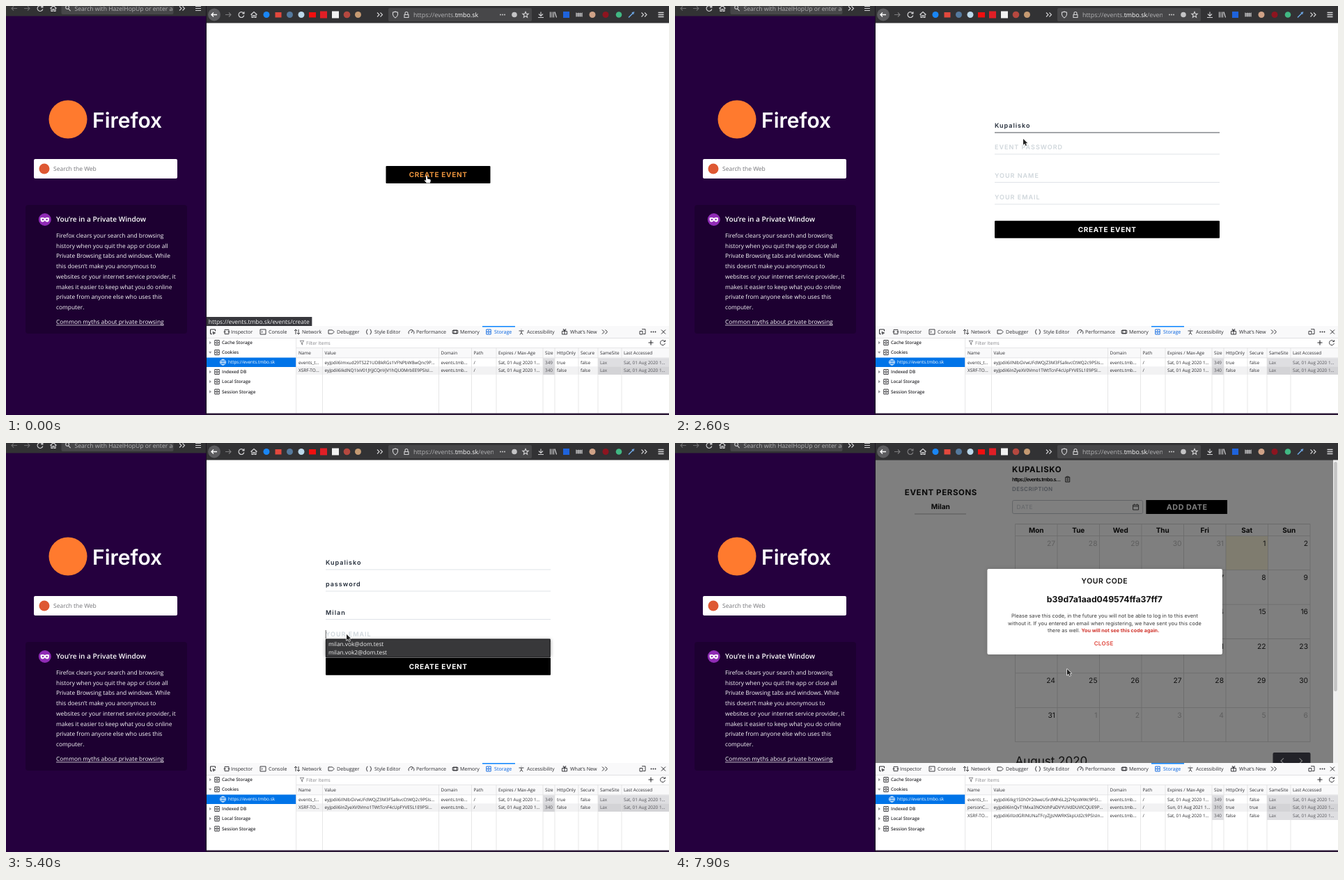
Write an HTML page with a canvas that moves like this. It is 952 px wide and 588 px high and loops after 8000 ms.

```html
<!DOCTYPE html>
<html lang="en">
<head>
<meta charset="utf-8">
<title>Create event</title>
<style>
html, body { margin: 0; width: 100%; height: 100%; overflow: hidden; background: #fff; }
canvas { display: block; width: 952px; height: 588px; }
</style>
</head>
<body>
<canvas id="stage"></canvas>
<script>
const W = 952, H = 588, LOOP = 8000;
const stage = document.getElementById('stage');
const dpr = window.devicePixelRatio || 1;
stage.width = W * dpr;
stage.height = H * dpr;
const g = stage.getContext('2d');

const EVENT = 'Kupalisko', PERSON = 'Milan', MAIL = 'milan.vok@dom.test';
const ui = (px, weight = 400) => `${weight} ${px}px "Open Sans", "Noto Sans", sans-serif`;
const page = (px, weight = 400) => `${weight} ${px}px Inter, sans-serif`;

const ICON = {
  back: 'M4 0H-4M-1-3L-4 0L-1 3',
  next: 'M-4 0H4M1-3L4 0L1 3',
  reload: 'M3-2.4A3.9 3.9 0 1 0 3.8 1M3.9-4.2V-1.6H1.3',
  stop: 'M-3-3L3 3M3-3L-3 3',
  home: 'M-4.5 0L0-4L4.5 0M-3-.8V4H-1V1H1V4H3V-.8',
  more: 'M-4-3L-1 0L-4 3M.5-3L3.5 0L.5 3',
  menu: 'M-4-3H4M-4 0H4M-4 3H4',
  shield: 'M0-4.4L3.5-3.4V0Q3 3 0 4.4Q-3 3-3.5 0V-3.4Z',
  lock: 'M-2 0V-2A2 2 0 0 1 2-2V0M-3 0H3V4H-3Z',
  star: 'M0-4.2L1.2-1.4L4.2-1.2L1.9.8L2.6 3.8L0 2.1L-2.6 3.8L-1.9.8L-4.2-1.2L-1.2-1.4Z',
  load: 'M0-4V2M-3-1L0 2L3-1M-4 4H4',
  books: 'M-4-4V4M-1.5-4V4M1-4V4M2.5-4L5 4',
  grid: 'M-4-3V3M-1.3-3V3M1.3-3V3M4-3V3M-4.5-1H4.5M-4.5 1.5H4.5',
  pen: 'M-4 4L2-2M1-3.5L3.5-1M2-2L4-4',
  find: 'M1.5-1.5A2.4 2.4 0 1 1 1.5-1.6M.8.6L3.6 3.6',
  pick: 'M3.5-1V-3.5H-3.5V3H-1M0 0L3.5 1.5L1.8 2L1.2 3.6Z',
  inspect: 'M-3-3H3V3H-3ZM-4.3 0H-1.5M1.5 0H4.3',
  prompt: 'M-4-3.5H4V3.5H-4ZM-2.3-1.5L-.8 0L-2.3 1.5',
  arrows: 'M-2 3.5V-3.5L-4-1.5M-2-3.5L0-1.5M2-3.5V3.5L4 1.5M2 3.5L0 1.5',
  tag: 'M-4-2.6H1.6L4.2 0L1.6 2.6H-4Z',
  braces: 'M-1.5-3.5Q-3-3.5-3-1.5Q-3 0-4 0Q-3 0-3 1.5Q-3 3.5-1.5 3.5M1.5-3.5Q3-3.5 3-1.5Q3 0 4 0Q3 0 3 1.5Q3 3.5 1.5 3.5',
  gauge: 'M-3.6 2.8A4 4 0 1 1 3.6 2.8M0 1.5L2-2',
  chip: 'M-3.8-2H3.8V2H-3.8ZM-2-3.4V3.4M0-3.4V-2M0 2V3.4M2-3.4V3.4',
  store: 'M-3.2-3.5H3.2V3.5H-3.2ZM-3.2 0H3.2M-1-1.7H1M-1 1.7H1',
  person: 'M-3.5-1.5H3.5M0-1.5V1M0 1L-2 4M0 1L2 4M0-3.8V-3.3',
  gift: 'M-3.5-1H3.5V3.5H-3.5ZM0-1V3.5M0-1Q-3-4-1.5-4Q0-3.5 0-1Q0-3.5 1.5-4Q3-4 0-1',
  globe: 'M4 0A4 4 0 1 1 4-.1M-4 0H4M0-4Q-3.6 0 0 4Q3.6 0 0-4',
  screens: 'M-1-3.8H4V3H1M-4-1H0V3.5H-4Z',
  funnel: 'M-2.8-2.8H2.8L.7 0V3L-.7 2V0Z',
  plus: 'M-3.5 0H3.5M0-3.5V3.5',
  clip: 'M-1.2-3H-3V4H3V-3H1.2M-1.2-3.8H1.2V-2H-1.2ZM-1.5 0H1.5M-1.5 2H1.5',
  date: 'M-4-3H4V4H-4ZM-4-1H4M-2-4.4V-3M2-4.4V-3',
  left: 'M2-3.8L-2 0L2 3.8',
  right: 'M-2-3.8L2 0L-2 3.8',
  arrow: 'M0 0V8.8L2.1 6.8L3.5 10L5 9.3L3.6 6.2H6.3Z',
  beam: 'M-1.8-5Q0-5 0-4Q0-5 1.8-5M0-4V4M-1.8 5Q0 5 0 4Q0 5 1.8 5',
  hand: 'M-.9 1Q0-.8 1 1V4.4L4.8 5.2Q6 5.6 5.8 7L5 10.6H-.2L-3.4 6.6Q-3 5.6-.9 7Z',
  mask: 'M49.5 304.5Q53 303.3 55.8 305Q58.6 303.3 62 304.5Q62.5 310.5 59 310.5Q57 310.5 55.8 308.5Q54.5 310.5 52.5 310.5Q49 310.5 49.5 304.5Z'
};
for (const k in ICON) ICON[k] = new Path2D(ICON[k]);

function rect(x, y, w, h, fill, r = 0) {
  g.fillStyle = fill;
  g.beginPath();
  g.roundRect(x, y, w, h, r);
  g.fill();
}
function frame(x, y, w, h, color, r = 0) {
  g.strokeStyle = color;
  g.lineWidth = 1;
  g.beginPath();
  g.roundRect(x, y, w, h, r);
  g.stroke();
}
function disc(x, y, r, fill) {
  g.fillStyle = fill;
  g.beginPath();
  g.arc(x, y, r, 0, 7);
  g.fill();
}
function icon(name, x, y, color, width = 1.1, size = 1) {
  g.save();
  g.translate(x, y);
  g.scale(size, size);
  g.strokeStyle = color;
  g.lineWidth = width;
  g.stroke(ICON[name]);
  g.restore();
}
function dots(x, y, color) {
  for (const d of [-3, 0, 3]) disc(x + d, y, 0.9, color);
}
function text(s, x, y, font, color, align = 'left', space = 0) {
  g.font = font;
  g.letterSpacing = space + 'px';
  g.textAlign = align;
  g.fillStyle = color;
  g.fillText(s, x, y);
  return g.measureText(s).width;
}
function clipped(x, y, w, h, draw) {
  g.save();
  g.beginPath();
  g.rect(x, y, w, h);
  g.clip();
  draw();
  g.restore();
}
function shadow(blur, color, draw) {
  g.save();
  g.shadowBlur = blur * dpr;
  g.shadowColor = color;
  draw();
  g.restore();
}

const NOTE = [
  'Firefox clears your search and browsing',
  'history when you quit the app or close all',
  'Private Browsing tabs and windows. While',
  'this doesn’t make you anonymous to',
  'websites or your internet service provider, it',
  'makes it easier to keep what you do online',
  'private from anyone else who uses this',
  'computer.'
];

function privateWindow() {
  rect(0, 0, 288, H, '#25003e');
  rect(0, 0, 288, 14.5, '#323234');
  icon('back', 12, 3.5, '#6a6a6c');
  icon('next', 30, 3.5, '#6a6a6c');
  icon('reload', 49, 3.5, '#d5d5d7');
  icon('home', 68, 3.5, '#d5d5d7');
  rect(79.5, -4, 161, 16, '#474749', 2);
  icon('find', 89, 3.5, '#cfcfd1');
  clipped(98, 0, 142, 14, () => text('Search with HazelHopUp or enter address', 98.5, 6.5, ui(8.6), '#b4b4b6'));
  icon('more', 253, 3.5, '#d5d5d7');
  icon('menu', 276, 3.5, '#d5d5d7');

  disc(89, 163, 27.5, '#ff7a2e');
  text('Firefox', 124, 174.5, page(30, 600), '#fff');
  rect(40, 220, 206, 28, '#fff', 2);
  disc(55, 234, 7.5, '#de5833');
  text('Search the Web', 68, 237.3, ui(8.5), '#737377');

  rect(28, 286, 232, 185, '#1d0031', 4);
  disc(55.8, 307, 9, '#8f2bb5');
  g.fillStyle = '#fff';
  g.fill(ICON.mask);
  disc(53, 307, 1.3, '#8f2bb5');
  disc(58.6, 307, 1.3, '#8f2bb5');
  text('You’re in a Private Window', 72, 309.8, ui(10.1, 600), '#fff');
  NOTE.forEach((s, i) => text(s, 72, 333 + i * 14.72, ui(8.4, 500), '#f9f9fa'));
  const w = text('Common myths about private browsing', 72, 457, ui(8.4, 500), '#f9f9fa');
  rect(72, 458.5, w, 0.8, '#f9f9fa');
}

function toolbar(t) {
  const loading = t >= 600 && t < 1500 || t >= 6600 && t < 7800;
  const idle = t >= 1000 && t < 1500 || t >= 7100 && t < 7700;
  const c = '#d5d5d7', dim = '#7c7c7e';
  rect(288, 0, 664, 24.5, '#323234');
  disc(299, 12.5, 9, '#5c5c5f');
  icon('back', 299, 12.5, '#fff', 1.3);
  icon('next', 319, 12.5, dim);
  icon(loading ? 'stop' : 'reload', 338, 12.5, t >= 7800 ? dim : c, 1.2);
  icon('home', 356, 12.5, c);
  disc(374, 12.5, 4.5, '#1a86f5');
  rect(386.5, 9, 9, 7.5, '#e2483d');
  disc(407.5, 12.5, 4.5, '#557a9e');
  disc(424, 12.5, 4.5, '#bcd8ea');
  rect(435, 9, 10, 7.5, '#f00f0f');
  rect(451, 7.5, 10, 10, '#e01f26');
  rect(468, 7.5, 10, 10, '#f2f2f2');
  disc(489.5, 12.5, 4.8, '#b5483f');
  disc(505.5, 12.5, 4.5, '#c59a72');
  icon('more', 537, 12.5, c);

  rect(549, 3, 206, 19, '#474749', 2);
  icon('shield', 559, 12.5, c);
  icon('lock', 575, 12.5, c);
  clipped(584, 3, 116, 19, () => {
    let x = 585;
    x += text('https://events.', x, 15.6, ui(8.9), '#b4b4b6');
    x += text('tmbo.sk', x, 15.6, ui(8.9), '#fff');
    if (t >= 1000) text('/events', x, 15.6, ui(8.9), '#b4b4b6');
  });
  dots(713, 12.5, c);
  disc(730, 12.5, 3.8, '#c4c4c6');
  icon('star', 746, 12.5, c);

  icon('load', 768, 12.5, c);
  icon('books', 785.5, 12.5, c);
  rect(800, 8, 9, 9, '#1f63dc');
  icon('grid', 823, 12.5, c);
  disc(842, 12.5, 4.5, '#cfa287');
  disc(861, 12.5, 4.5, '#8d1520');
  disc(880, 12.5, 4.3, idle ? '#77777a' : '#41b883');
  icon('pen', 898, 12.5, '#6fa8e6', 1.5);
  icon('more', 916.5, 12.5, c);
  icon('menu', 940.5, 12.5, c, 1.3);
}

const TABS = [
  [317, 323, 'inspect', 'Inspector'], [369, 377, 'prompt', 'Console'],
  [418, 425, 'arrows', 'Network'], [467, 475, 'tag', 'Debugger'],
  [521, 529, 'braces', 'Style Editor'], [582, 589, 'gauge', 'Performance'],
  [645, 652, 'chip', 'Memory'], [693, 701, 'store', 'Storage'],
  [740, 748, 'person', 'Accessibility'], [802, 810, 'gift', 'What’s New']
];
const TREE = [[484, 'Cache Storage'], [498, 'Cookies'], [526, 'Indexed DB'], [540, 'Local Storage'], [554.5, 'Session Storage']];
const HEADS = ['Name', 'Value', 'Domain', 'Path', 'Expires / Max-Age', 'Size', 'HttpOnly', 'Secure', 'SameSite', 'Last Accessed'];
const COLS = [417, 454.5, 621.5, 668.5, 704, 771, 788, 822, 850, 884, 952];
const SESSION = ['Imxud29TS2Z1UDBkRGs1VFNPbW8wQnc9P…', 'IlNIbGVwUFdWQjZ3M3FSalkvcCtWQ2c9PSIs…', 'Ikg1S0h0Y2dweU5rdWh6L2J2YkJsWWc9PSI…'];
const XSRF = ['IkdNQ1IxV01JYjJCQnVjV1hQU0MrbEE9PSIsI…', 'InZyeXV0Vmo1TWtTcnF4cUpFYVE5L1E9PSI…', 'IlIzdGRINUNaTFcyZjJsNWRKSkpUd2c9PSIsIn…'];

function cookies(t) {
  const v = t < 1600 ? 0 : t < 7800 ? 1 : 2;
  const day = 'Sat, 01 Aug 2020 1…';
  const row = (name, value, until, size, http, secure) =>
    [name, 'eyJpdiI6' + value, 'events.tmb…', '/', until, size, http, secure, 'Lax', day];
  const list = [
    row('events_t…', SESSION[v], day, '349', 'true', 'false'),
    row('XSRF-TO…', XSRF[v], day, '340', 'false', 'false')
  ];
  if (v === 2) list.splice(1, 0, row('personC…', 'InQvT1Mxa3NOVzhPaDVYUVdDUVlCQUE9P…', 'Sun, 01 Aug 2021 1…', '310', 'true', 'true'));
  return list;
}

function devtools(t) {
  const dark = '#2a2a2e', grey = '#55555a', line = '#e0e0e2';
  rect(288, 460, 664, 128, '#fff');
  rect(288, 460, 664, 17, '#f9f9fa');
  rect(288, 477, 664, 1, line);
  icon('pick', 297, 468.5, dark, 1);
  for (const [ix, tx, name, label] of TABS) {
    const c = label === 'Storage' ? '#0060df' : dark;
    icon(name, ix, 468.5, c, 0.9);
    text(label, tx, 471.2, ui(7.1), c);
  }
  rect(684, 460, 47, 1.5, '#0a84ff');
  icon('more', 860, 468.5, dark, 1);
  icon('screens', 914, 468.5, dark, 0.9);
  dots(929.5, 468.5, dark);
  icon('stop', 944, 468.5, dark, 1);

  rect(288, 505.5, 128.5, 13.5, '#0074e8');
  for (const [y, label] of TREE) {
    g.fillStyle = '#98989c';
    g.fill(new Path2D(label === 'Cookies'
      ? `M291 ${y - 1.3}h4.4l-2.2 3z` : `M292 ${y - 2.2}v4.4l3-2.2z`));
    icon('store', 303, y, dark, 0.9);
    text(label, 310, y + 2.3, ui(6.4, 600), dark);
  }
  icon('globe', 311.5, 512.2, '#fff', 0.9);
  text('https://events.tmbo.sk', 319, 514.4, ui(6.4), '#fff');
  rect(416.3, 477.5, 0.8, 108, line);

  icon('funnel', 425, 484, '#7a7a7e', 0.9);
  text('Filter Items', 431, 486.6, ui(6.7), '#85858a');
  icon('plus', 926, 484, dark, 1.1);
  icon('reload', 943, 484, dark, 1, 0.9);
  rect(417, 491, 535, 15, '#f9f9fa');
  rect(417, 491, 535, 0.8, line);
  rect(417, 505.5, 535, 0.8, line);

  cookies(t).forEach((cells, r) => {
    const y = 506.3 + r * 11.9;
    if (r % 2) rect(417, y, 535, 11.9, '#f2f2f3');
    cells.forEach((s, i) => {
      const fixed = i === 5 || i > 7;
      if (fixed) rect(COLS[i], y, COLS[i + 1] - COLS[i], 11.9, r % 2 ? '#d3d3d6' : '#dedee1');
      clipped(COLS[i], y, COLS[i + 1] - COLS[i] - 1, 12, () =>
        text(s, COLS[i] + 3, y + 8.2, ui(6.4), fixed ? grey : dark));
    });
  });
  HEADS.forEach((s, i) => {
    text(s, COLS[i] + 3, 500.8, ui(6.4), dark);
    if (i) rect(COLS[i] - 0.4, 491, 0.8, 94.5, line);
  });
  rect(288, 585.5, 664, 2.5, '#2b1836');
}

function status(s) {
  g.font = ui(8.45);
  g.letterSpacing = '0px';
  rect(288, 447, g.measureText(s).width + 6.5, 13, '#38383d');
  text(s, 290.8, 456.8, ui(8.45), '#f4f4f5');
}

function button(x, y, w, hot) {
  rect(x, y, w, 25, '#000', 1);
  text('CREATE EVENT', 620.7, y + 15.8, page(10, 700), hot ? '#e8923c' : '#fff', 'center', 0.7);
}

// line: underline y; on/off: focus span; open/shut: suggestion list span; hot: first item lit
const FIELDS = [
  { line: 182, hint: 'EVENT NAME', items: [EVENT], on: 1700, off: 2900, open: 2000, hot: 2200, shut: 2600 },
  { line: 213, hint: 'EVENT PASSWORD', items: ['password'], on: 2900, off: 4100, open: 3200, hot: 3400, shut: 3600 },
  { line: 253.5, hint: 'YOUR NAME', items: [PERSON, PERSON.toLowerCase()], on: 4100, off: 5200, open: 4300, hot: 4600, shut: 4800 },
  { line: 285, hint: 'YOUR EMAIL', items: [MAIL, MAIL.replace('@', '2@')], on: 5200, off: 6600, open: 5400, hot: 5600, shut: 5900 }
];

function form(t) {
  for (const f of FIELDS) {
    const focus = t >= f.on && t < f.off, done = t >= f.shut;
    text(done ? f.items[0] : f.hint, 459, f.line - 6.6, page(9, 600), done ? '#222b38' : '#cfd6db', 'left', 1);
    rect(459, f.line - 0.5, 323, 1, focus ? '#4a4f57' : '#dfe3e8');
    if (focus && !done) rect(458.8, f.line - 16, 0.8, 12, '#333');
  }
  button(459, 308.8, 323, t >= 6300);
  const f = FIELDS.find(f => t >= f.open && t < f.shut);
  if (!f) return;
  const top = f.line - 3.2, h = 2.8 + f.items.length * 11.8;
  shadow(5, 'rgba(0,0,0,.4)', () => rect(459, top, 322.5, h, '#38383a'));
  if (t >= f.hot) rect(460, top + 1, 320.5, 12.2, '#4b4b4d');
  frame(459.4, top + 0.4, 321.7, h - 0.8, '#1c1c1e');
  f.items.forEach((s, i) => text(s, 463, top + 10.5 + i * 11.8, ui(8.3), '#f2f2f2'));
}

function calendar(x, y) {
  const cw = 60.5, rh = 49.4, top = y + 115.3, grid = '#d6d6d6';
  rect(x + 5 * cw, top, cw, rh, '#fffadf');
  for (let i = 0; i <= 7; i++) rect(x + i * cw - 0.4, y + 98.5, 0.8, 16.8 + 6 * rh, grid);
  rect(x, y + 98.1, 7 * cw, 0.8, grid);
  for (let i = 0; i <= 6; i++) rect(x, top + i * rh - 0.4, 7 * cw, 0.8, grid);
  ['Mon', 'Tue', 'Wed', 'Thu', 'Fri', 'Sat', 'Sun'].forEach((d, i) =>
    text(d, x + (i + 0.5) * cw, y + 110.6, page(10, 700), '#111', 'center'));
  for (let i = 0; i < 42; i++) {
    const n = i - 4, inside = n > 0 && n < 32;
    text(n < 1 ? n + 31 : inside ? n : n - 31, x + (i % 7 + 1) * cw - 3, top + Math.floor(i / 7) * rh + 14.3,
      page(10.3), inside ? '#222' : '#bdbdbd', 'right');
  }
  text('August 2020', x, y + 445, page(17), '#222');
  rect(x + 370, y + 427, 54, 24, '#444450', 2);
  icon('left', x + 383.5, y + 439, '#fff', 1.1);
  icon('right', x + 410, y + 439, '#fff', 1.1);
}

function eventPage(t) {
  const ready = t >= 7600, dx = ready ? -3.6 : 0, dy = ready ? 18 : 0, x = 487.7 + dx;
  text('EVENT PERSONS', 333.4 + dx, 75.2, page(11.5, 700), '#111', 'left', 0.6);
  if (ready) {
    text(EVENT.toUpperCase(), x, 42, page(11.5, 700), '#111', 'left', 0.6);
    text(PERSON, 381.3, 95, page(10.2, 700), '#111', 'center');
    rect(344, 101.5, 74, 1, '#b5b5b5');
  }
  text('https://events.tmbo.s…', x, 36.8 + dy, page(7.4, 600), '#111', 'left', -0.7);
  icon('clip', x + 79.6, 34 + dy, '#333', 1);
  text('DESCRIPTION', x, 51.3 + dy, page(8, 600), '#98a0ac', 'left', 0.4);
  frame(x + 0.5, 64.5 + dy, 187, 19, '#c4c8cd', 2);
  text('DATE', x + 6.5, 77.2 + dy, page(8.5), '#c9ced3', 'left', 0.5);
  icon('date', x + 177.5, 74 + dy, '#444', 1);
  rect(x + 192.3, 64 + dy, 116.6, 20, '#000');
  text('ADD DATE', x + 251, 78 + dy, page(10.8, 700), '#fff', 'center', 0.55);
  calendar(x + 4.4, dy);

  rect(288, 24, 664, 436, 'rgba(0,0,0,.5)');
  if (ready) {
    rect(945, 24.5, 7, 435.5, '#f0f0f0');
    rect(946.2, 27, 4.6, 330, '#c4c4c4', 2.3);
  }
  shadow(6, 'rgba(0,0,0,.15)', () => rect(452 + dx, 181, 337.5, 123, '#fff', 2));
  const c = 620.5 + dx, body = page(7.45), bold = page(7.2, 700);
  text('YOUR CODE', c, 202.3, page(10.5, 600), '#111', 'center', 0.5);
  text('b39d7a1aad049574ffa37ff7', c, 229, page(12.25, 700), '#111', 'center');
  text('Please save this code, in the future you will not be able to log in to this event', c, 251.2, body, '#3c3c3c', 'center');
  text('without it. If you entered an email when registering, we have sent you this code', c, 261.8, body, '#3c3c3c', 'center');
  const w = text('there as well. ', 538.6 + dx, 272.4, body, '#3c3c3c');
  text('You will not see this code again.', 538.6 + dx + w, 272.4, bold, '#d0342c');
  text('CLOSE', c - 1.3, 291, page(8, 600), '#e0483e', 'center', 0.3);
}

const PATH = [
  [0, 604, 244], [900, 604, 244], [1700, 506, 175], [1900, 506, 175], [2000, 505, 192],
  [2400, 502, 189], [2600, 500, 191], [2700, 499, 194], [2900, 497, 203], [3100, 496, 205],
  [3400, 496, 216], [3600, 496, 216], [4100, 494, 243], [4200, 494, 243], [4700, 492, 257],
  [4800, 492, 257], [5000, 489, 269], [5200, 489, 275], [5400, 489, 275], [5700, 488, 288],
  [5900, 490, 290], [6400, 563, 325], [LOOP, 563, 325]
];
const BEAM = [[1500, 2000], [2900, 3200], [4000, 4300], [5200, 5400]];

function pointer(t) {
  const i = PATH.findIndex(p => p[0] > t);
  const [t0, x0, y0] = PATH[i - 1], [t1, x1, y1] = PATH[i];
  const k = (t - t0) / (t1 - t0), e = k * k * (3 - 2 * k);
  g.save();
  g.translate(x0 + (x1 - x0) * e, y0 + (y1 - y0) * e);
  g.lineJoin = 'round';
  const draw = (name, fill, edge, width) => {
    g.strokeStyle = edge;
    g.lineWidth = width;
    g.stroke(ICON[name]);
    if (fill) { g.fillStyle = fill; g.fill(ICON[name]); }
  };
  if (BEAM.some(([a, b]) => t >= a && t < b)) {
    draw('beam', null, '#fff', 2);
    draw('beam', null, '#222', 1);
  } else if (t < 900 || t >= 6300 && t < 7300) {
    draw('hand', '#fff', '#111', 1);
  } else {
    draw('arrow', '#222', '#fff', 1.3);
  }
  g.restore();
}

function render(t) {
  g.setTransform(dpr, 0, 0, dpr, 0, 0);
  g.textRendering = 'geometricPrecision';
  rect(0, 0, W, H, '#fff');
  privateWindow();
  toolbar(t);
  clipped(288, 24, 664, 436, () => {
    if (t < 900) button(545.5, 230, 150, true);
    else if (t >= 1200 && t < 7300) form(t);
    else if (t >= 7300) eventPage(t);
    if (t < 900) status('https://events.tmbo.sk/events/create');
    else if (t >= 6700 && t < 7200) status('Waiting for events.tmbo.sk…');
  });
  devtools(t);
  rect(287.2, 0, 0.8, H, '#17101c');
  pointer(t);
}

const start = performance.now();
function tick() {
  const t = (performance.now() - start) % LOOP;
  render(Math.floor(t / 100) * 100);
  requestAnimationFrame(tick);
}
tick();
</script>
</body>
</html>
```
